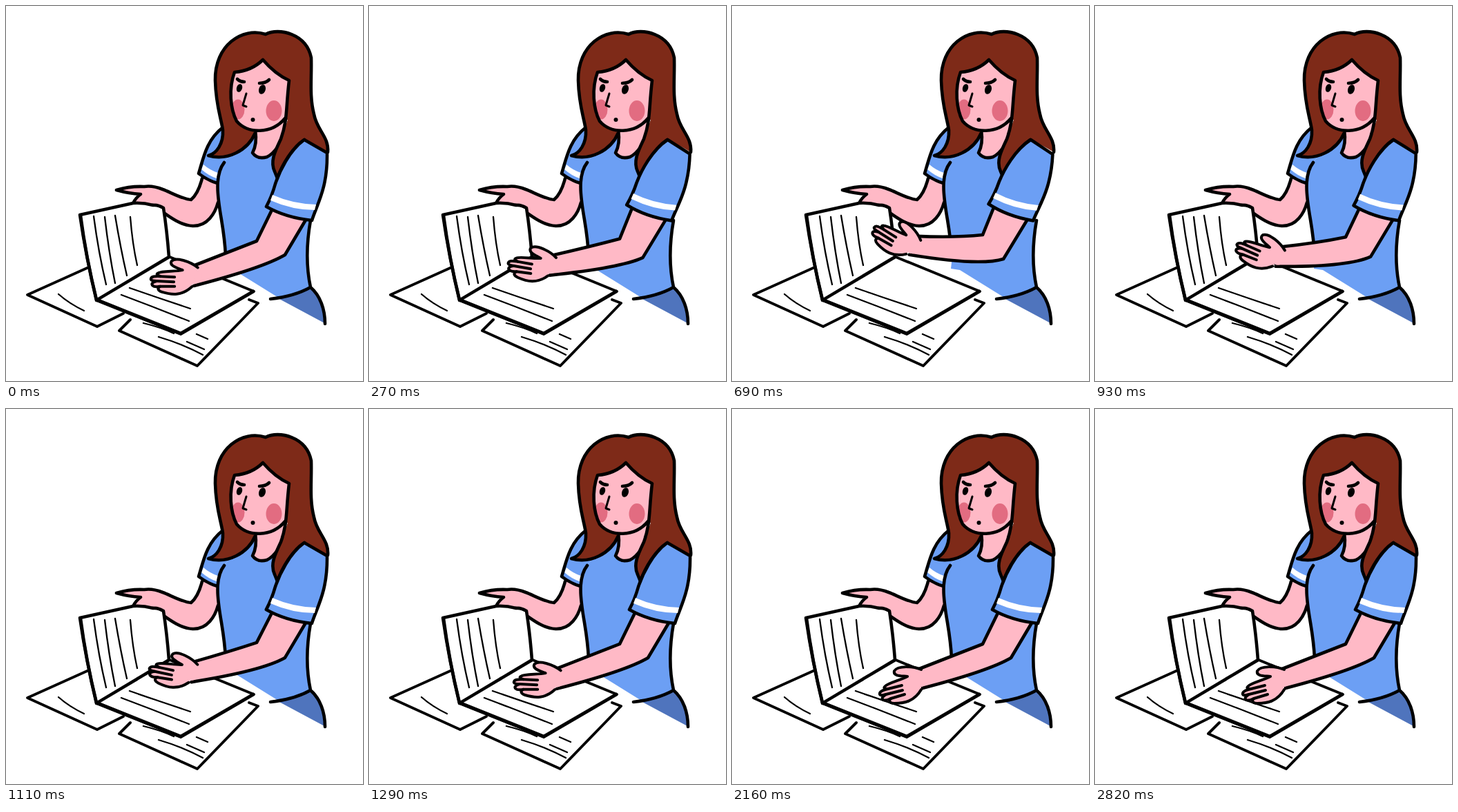
An HTML page that plays this animation: 517 px wide and 544 px high, repeating every 2850 ms.

```html
<!DOCTYPE html>
<html lang="en">
<head>
<meta charset="utf-8">
<title>Sorting papers</title>
<style>
html, body { margin: 0; width: 100%; height: 100%; overflow: hidden; background: #fff; }
svg { display: block; width: 517px; height: 544px; }
path, ellipse { stroke-linecap: round; stroke-linejoin: round; }
.ink { stroke: #000; stroke-width: 4.6; fill: none; }
.fine { stroke-width: 4; }
.thin { stroke: #000; stroke-width: 2.3; fill: none; }
.paper { stroke: #000; stroke-width: 3.9; fill: #fff; }
.book { stroke-width: 4.6; }
.skin { fill: #ffb9c6; }
.shirt { fill: #6c9ff4; }
.hair { fill: #7e2a18; }
.cheek { fill: #e26c81; }
.white { fill: #fff; }
</style>
</head>
<body>
<svg viewBox="0 0 517 544">
  <!-- loose sheets -->
  <path class="paper" d="M122 378L31 419L132 465L170 446"/>
  <path class="thin" d="M76 418Q92 432 113 442"/>
  <path class="paper" d="M180 455L164 471L277 522L365 431L352 426"/>
  <path class="thin" d="M199 460Q224 466 243 475M221 480Q255 490 285 506M276 476L292 483M262 487L287 498"/>

  <!-- torso -->
  <path class="shirt" d="M316 226C302 245 306 275 312 310Q317 340 318 372L317 381L330 383L396 424L441 408C437 385 435 350 440 312L432 195L358 180Z"/>
  <path fill="#4f74bd" d="M394 424Q418 421 441 408Q458 425 463 461Z"/>
  <path class="ink" d="M441 311C435 345 435 380 441 408C455 420 462 440 462 461M441 408Q418 421 383 425"/>

  <!-- far arm -->
  <path class="skin" d="M284 248C281 260 275 275 268 281C255 280 238 270 227 266Q212 260 200 262Q180 261 160 267Q178 272 195 273Q188 278 184 286L213 289C232 302 250 318 270 319C292 320 303 300 307 285L306 255Z"/>
  <path class="ink" d="M284 250C281 262 275 275 268 281C255 280 238 270 227 266Q212 260 200 262Q180 261 160 267Q178 272 195 273Q188 278 184 286M213 289C232 302 250 318 270 319C292 320 303 300 307 285"/>
  <path class="shirt" d="M314 176C290 195 286 220 279 243Q292 253 306 257Q304 240 316 226L340 200Z"/>
  <path class="white" d="M286 230Q295 238 307 242L305 250Q293 246 283 237Z"/>
  <path class="ink" d="M314 176C290 195 286 220 279 243Q292 253 306 257M316 227C302 245 306 275 312 310Q317 340 318 362"/>

  <!-- open book -->
  <path class="paper book" d="M184 286L107 303Q116 365 131 427L236 364Q233 325 228 293Q220 288 213 289Q198 285 184 286"/>
  <path class="paper" d="M131 427L237 364L359 414L253 476Z"/>
  <path class="ink" d="M108 304Q116 365 131 426L253 475L358 414"/>
  <path class="thin" d="M127 305Q134 358 145 404M143 306Q149 358 158 402M158 304Q166 352 175 391M180 306Q183 345 190 376"/>
  <path class="thin" d="M179 409Q222 424 267 439M167 419Q215 437 265 457"/>

  <!-- neck, hair and face -->
  <path class="skin" d="M361 178Q364 200 357 213Q364 223 378 219Q392 210 400 195L405 150Z"/>
  <path class="ink" d="M361 180Q364 200 357 213Q364 223 378 219Q386 215 393 205"/>
  <path class="hair" d="M376 41C342 30 302 57 303 108C304 145 311 160 314 180C315 200 305 214 293 217C320 225 350 210 361 182L408 165C400 190 380 220 388 238L393 250C400 230 415 205 432 194Q448 201 466 212C468 190 450 180 446 157C439 130 443 104 442 75C435 40 395 31 376 41Z"/>
  <path class="skin" d="M372 78Q356 94 331 96C324 120 325 150 334 167C350 186 385 186 404 163L410 108Q390 99 372 78Z"/>
  <ellipse class="cheek" cx="336" cy="150" rx="9.5" ry="14.5"/>
  <ellipse class="cheek" cx="388" cy="152" rx="11.5" ry="15"/>
  <path class="ink" d="M376 41C342 30 302 57 303 108C304 145 311 160 314 180C315 200 305 214 293 217C320 225 350 210 361 184M331 96Q356 94 372 78Q390 99 410 108C405 150 408 165 398 193C390 210 382 225 389 240L393 250C400 230 415 205 432 194M331 96C322 120 325 150 334 167C350 186 385 186 404 163M376 41C395 31 435 40 442 75C443 104 439 130 446 157C450 180 468 190 466 212"/>
  <ellipse cx="338" cy="119" rx="4" ry="6" transform="rotate(18 338 119)"/>
  <ellipse cx="371" cy="121" rx="4.8" ry="7" transform="rotate(18 371 121)"/>
  <path class="ink" d="M335 106Q339 110 345 110M367 112Q376 112 381 107"/>
  <path class="ink" style="stroke-width:3" d="M348 127Q345 137 343 144L348 146"/>
  <circle cx="357.5" cy="165" r="3"/>

  <!-- near arm -->
  <path id="armFill" class="skin"/>
  <path id="armLine" class="ink"/>
  <g id="hand">
    <circle class="skin" cx="271" cy="391" r="12.5"/>
    <path class="skin" d="M274 378C262 373 240 372 235 380C233 388 246 387 254 388C245 393 225 398 222 402L214 414L219 422L235 427C250 427 264 424 274 407Z"/>
    <path class="ink fine" d="M274 378C262 373 240 372 235 380C233 388 246 387 254 388C245 393 225 398 222 402C218 405 222 406 226 406C218 408 213 410 214 414C215 416 219 415 223 414C218 417 216 420 219 422C223 424 227 421 230 420C226 424 229 427 235 427C250 427 264 424 274 407"/>
    <path class="ink fine" d="M226 406L246 401M223 414L247 408M230 420L250 414"/>
  </g>
  <g id="sleeve">
    <path class="shirt" stroke="#000" stroke-width="4.6" d="M432 194C410 210 396 240 390 258Q385 276 377 291Q405 307 443 311C450 288 466 265 465 213Z"/>
    <path class="white" d="M386 274Q415 287 449 288L447 296Q415 296 383 282Z"/>
  </g>
</svg>
<script>
const LOOP = 2850, STEP = 30;
const SHOULDER = [432, 205], FOREARM = [371, 347], WRIST = [271, 391];
const $ = id => document.getElementById(id);

const ease = (t, from, to) => {
  const u = Math.min(1, Math.max(0, (t - from) / (to - from)));
  return u * u * (3 - 2 * u);
};

const turn = ([x, y], [cx, cy], deg) => {
  const a = deg * Math.PI / 180, c = Math.cos(a), s = Math.sin(a);
  return [cx + (x - cx) * c - (y - cy) * s, cy + (x - cx) * s + (y - cy) * c];
};

function pose(t) {
  // the shoulder leads, the forearm follows, the hand drags behind
  const lift = ease(t, 0, 670) - ease(t, 670, 1310);
  const swing = ease(t, 0, 430) - ease(t, 670, 1150);
  const lag = lift - swing;
  const upper = 3.7 * swing, lower = 24 * lift;
  const flex = (17 + 5.5 * lift + 10 * lag) * (1 - ease(t, 1260, 1590));

  const onUpper = p => turn(p, SHOULDER, upper);
  const onLower = p => {
    const [x, y] = turn(p, FOREARM, lower);
    return [x + 8 * lag, y];
  };

  const inner = [363, 341 - 9 * lift];
  const outer = [404 - 11 * swing, 361 + 6 * swing];
  const top = `M${onUpper([384, 298])}L${inner}Q${onLower([322, 357])} ${onLower([271, 377])}`;
  const bend = `Q${onLower([372, 380])} ${outer}L${onUpper([436, 307])}`;
  const wristLow = onLower([272, 406]);
  $('armFill').setAttribute('d', `${top}L${wristLow}${bend}Z`);
  $('armLine').setAttribute('d', `${top}M${wristLow}${bend}`);

  const [wx, wy] = onLower(WRIST);
  $('hand').setAttribute('transform',
    `translate(${wx} ${wy}) rotate(${lower + flex}) translate(${-WRIST[0]} ${-WRIST[1]})`);
  $('sleeve').setAttribute('transform', `rotate(${upper} ${SHOULDER})`);
}

const start = performance.now();
function frame() {
  const t = (performance.now() - start) % LOOP;
  pose(Math.floor(t / STEP) * STEP);
  requestAnimationFrame(frame);
}
frame();
</script>
</body>
</html>
```
